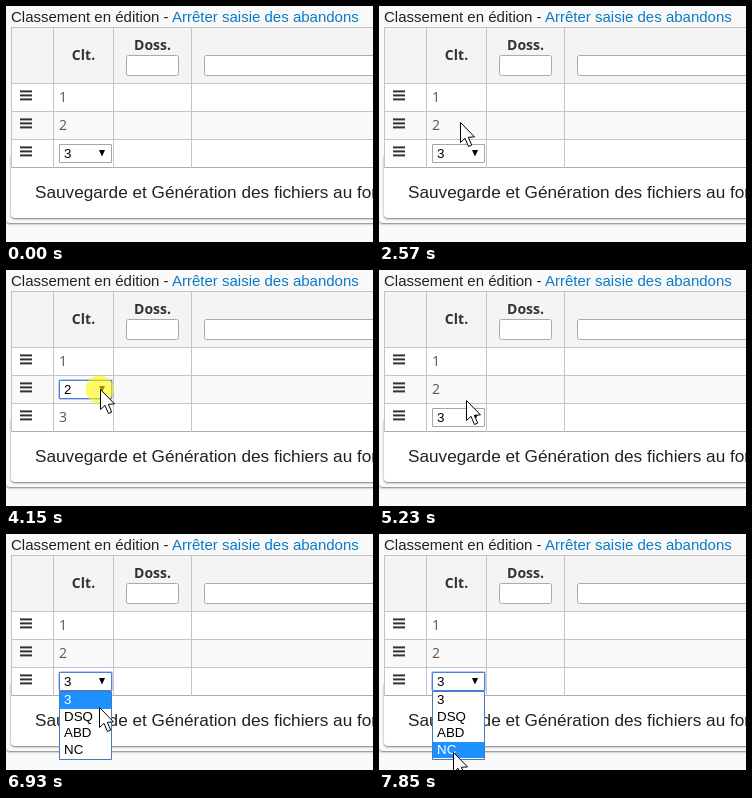
An HTML page with a canvas for the animation above (8000 ms loop, 367 by 236 pixels).

```html
<!DOCTYPE html>
<html lang="fr">
<head>
<meta charset="utf-8">
<title>Classement</title>
<style>
html, body { margin: 0; width: 100%; height: 100%; overflow: hidden; background: #fafafa; }
canvas { display: block; width: 367px; height: 236px; }
</style>
</head>
<body>
<canvas id="stage" width="367" height="236"></canvas>
<script>
const ctx = document.getElementById('stage').getContext('2d');
const LOOP = 8000, W = 367, H = 236;
const STEP = 77, GLIDE = 200, PRESS = 150;
const ENTER = 1480, ENTRY = { x: 205, y: 222 };
const ROW_H = 28, OPTION_H = 16.6;
const ARIAL = '"Liberation Sans", Arial, sans-serif';
const OPEN = '"Open Sans", "Noto Sans", sans-serif';
const BORDER = '#c4c4c4';

// Where the pointer arrives and when; a press may edit a row or toggle the list.
const stops = [
  { at: 2410, x: 81, y: 98, glide: 2410 - ENTER },
  { at: 2570, x: 81, y: 116, press: 2740, row: 1 },
  { at: 3210, x: 100, y: 116, press: 3440, list: 'open' },
  { at: 4150, x: 94, y: 119, press: 4150, list: 'closed' },
  { at: 4460, x: 91, y: 142, press: 4610, row: 2 },
  { at: 5300, x: 85, y: 123, press: 5460, row: 1 },
  { at: 6020, x: 89, y: 137, press: 6160, row: 2 },
  { at: 6470, x: 93, y: 147, press: 6620, list: 'open' },
  { at: 6930, x: 93, y: 173 },
  { at: 7630, x: 87, y: 204, glide: 700 },
  { at: 7850, x: 74, y: 218 }
];

const within = (v, a, b) => v >= a && v < b;
const rowTop = row => 82 + row * ROW_H;

function pointerAt(t) {
  if (t < ENTER) return null;
  let { x, y } = ENTRY;
  for (const stop of stops) {
    const left = Math.ceil((stop.at - t) / STEP - 0.1) * STEP;
    const done = Math.min(1, Math.max(0, 1 - left / (stop.glide || GLIDE)));
    x += (stop.x - x) * done;
    y += (stop.y - y) * done;
  }
  return { x: Math.round(x), y: Math.round(y) };
}

function stateAt(t) {
  const state = { row: 2, list: '', pressed: false };
  for (const { press, row, list } of stops) {
    if (!(t >= press)) continue;
    state.list = list || '';
    state.pressed = t < press + PRESS;
    if (row !== undefined && !state.pressed) state.row = row;
  }
  return state;
}

function rect(x, y, w, h, color) {
  ctx.fillStyle = color;
  ctx.fillRect(x, y, w, h);
}

function text(str, x, y, font, color, align = 'left') {
  ctx.font = font;
  ctx.fillStyle = color;
  ctx.textAlign = align;
  ctx.fillText(str, x, y);
}

function box(x, y, w, h, r, fill, stroke) {
  ctx.beginPath();
  ctx.roundRect(x + 0.5, y + 0.5, w - 1, h - 1, r);
  ctx.fillStyle = fill;
  ctx.fill();
  ctx.strokeStyle = stroke;
  ctx.lineWidth = 1;
  ctx.stroke();
}

function panel(x, bottom, fill) {
  ctx.save();
  ctx.shadowColor = 'rgba(0,0,0,.5)';
  ctx.shadowBlur = 2;
  ctx.shadowOffsetY = 1;
  ctx.beginPath();
  ctx.roundRect(x, bottom - 240, W + 20, 240, 4);
  ctx.fillStyle = fill;
  ctx.fill();
  ctx.restore();
}

function drawPage() {
  rect(0, 0, W, H, '#fafafa');
  panel(0, 217, '#f9f9f9');
  ctx.save();
  ctx.beginPath();
  ctx.rect(0, 150, W, H);
  ctx.clip();
  panel(5, 212, '#fff');
  ctx.restore();

  text('Classement en édition - ', 5, 16, '15px ' + ARIAL, '#222');
  text('Arrêter saisie des abandons', 166, 16, '15px ' + ARIAL, '#0b7bc8');
  text('Sauvegarde et Génération des fichiers au format', 29, 192, '17.2px ' + ARIAL, '#222');

  rect(5, 21, W, 57, '#f4f4f4');
  rect(5, 78, W, 84, '#fff');
  rect(5, 106, W, 27, '#f9f9f9');
  rect(5, 21, W, 1, BORDER);
  for (let i = 0; i < 4; i++) rect(5, 77 + i * ROW_H, W, 1, i === 3 ? '#aaa' : BORDER);
  for (const x of [5, 47, 107, 185]) rect(x, 21, 1, 141, BORDER);

  text('Clt.', 77.5, 54, 'bold 14px ' + OPEN, '#333', 'center');
  text('Doss.', 146.5, 44, 'bold 14px ' + OPEN, '#333', 'center');
  box(120, 49, 53, 21, 2, '#fff', '#aaa');
  box(198, 49, 200, 21, 2, '#fff', '#aaa');

  for (let row = 0; row < 3; row++)
    for (let bar = 0; bar < 3; bar++) rect(14, 84.4 + row * ROW_H + bar * 4, 12, 2, '#333');
}

function drawSelect(row, focus, hover) {
  const y = rowTop(row);
  if (focus) box(52, y - 1, 55, 21, 2, '#fff', '#b9cdf3');
  box(53, y, 53, 19, 0, '#fff', focus ? '#4a7fdc' : hover ? '#858585' : '#a6a6a6');
  text(row + 1, 58, y + 14, '13.33px ' + ARIAL, '#000');
  ctx.fillStyle = '#000';
  ctx.fill(new Path2D(`M93 ${y + 6}h6l-3 6.5z`));
}

function drawList(row, tip) {
  const top = rowTop(row) + 20;
  const edge = i => Math.round(top + i * OPTION_H);
  const active = Math.max(0, Math.min(3, Math.floor((tip.y - top) / OPTION_H)));
  box(53, top - 1, 53, 69, 0, '#fff', '#4a78b8');
  [row + 1, 'DSQ', 'ABD', 'NC'].forEach((label, i) => {
    const on = i === active;
    if (on) rect(54, edge(i), 51, edge(i + 1) - edge(i), '#1e90ff');
    text(label, 58, edge(i) + 12, '13.33px ' + ARIAL, on ? '#fff' : '#000');
  });
}

function drawPointer({ x, y }, pressed) {
  if (pressed) {
    ctx.beginPath();
    ctx.arc(x - 0.5, y + 0.5, 14, 0, Math.PI * 2);
    ctx.fillStyle = 'rgba(255,246,0,.6)';
    ctx.fill();
  }
  ctx.save();
  ctx.translate(x + 0.5, y + 0.5);
  const arrow = new Path2D('M0 0V20L4.5 15.8L8 24L11.2 22.6L7.8 14.8L14 14.4Z');
  ctx.fillStyle = '#fff';
  ctx.fill(arrow);
  ctx.strokeStyle = '#000';
  ctx.lineWidth = 1;
  ctx.stroke(arrow);
  ctx.restore();
}

function draw(t) {
  const tip = pointerAt(t);
  const state = stateAt(t);
  const top = rowTop(state.row);
  const hover = tip && within(tip.x, 53, 106) && within(tip.y, top, top + 19);

  drawPage();
  for (let row = 0; row < 3; row++) {
    if (row === state.row) drawSelect(row, state.list, hover);
    else text(row + 1, 53, rowTop(row) + 14, '14px ' + OPEN, '#5c5548');
  }
  if (state.list === 'open') drawList(state.row, tip);
  if (tip) drawPointer(tip, state.pressed);
}

const began = performance.now();
function frame() {
  draw((performance.now() - began) % LOOP);
  requestAnimationFrame(frame);
}
frame();
</script>
</body>
</html>
```
